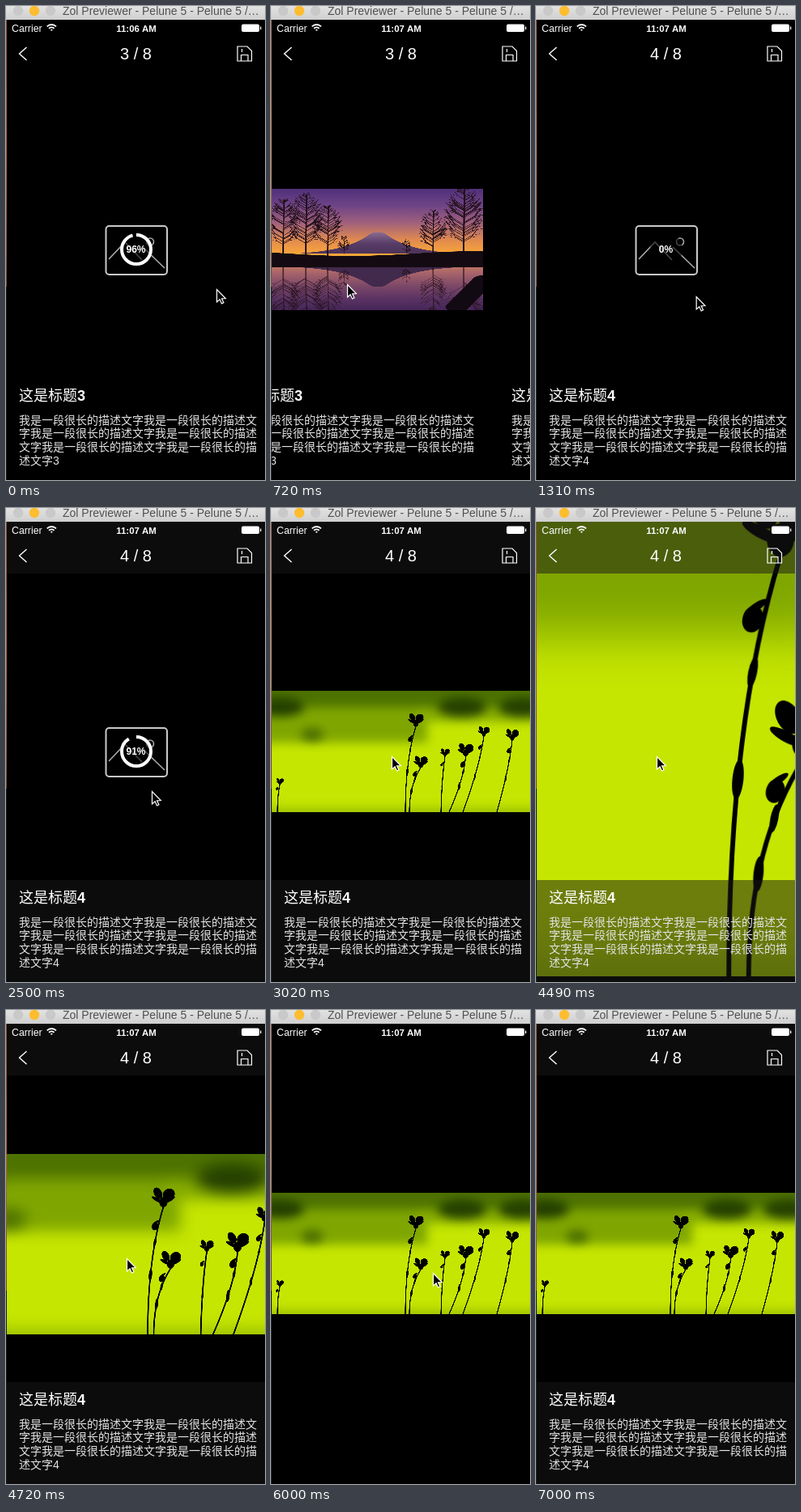
An HTML page with a canvas for the animation above (7280 ms loop, 320 px wide and 586 px high).

```html
<!DOCTYPE html>
<html lang="zh-CN">
<head>
<meta charset="utf-8">
<style>
html, body { margin: 0; width: 100%; height: 100%; overflow: hidden; background: #000; }
canvas { display: block; width: 320px; height: 586px; }
</style>
</head>
<body>
<canvas id="stage" width="320" height="586"></canvas>
<script>
let ctx = document.getElementById('stage').getContext('2d');
const LOOP = 7280, PAGE = 340;
const FONT = '"Liberation Sans", "Noto Sans CJK SC", "Noto Sans CJK JP", sans-serif';

function ramp(t, from, to) {
  const u = Math.max(0, Math.min(1, (t - from) / (to - from)));
  return u * u * (3 - 2 * u);
}

let seed = 5;
function random(a, b) {
  seed = (seed * 16807) % 2147483647;
  return a + (b - a) * seed / 2147483647;
}

function rect(x, y, w, h, color) {
  ctx.fillStyle = color;
  ctx.fillRect(x, y, w, h);
}
function path(points, close) {
  ctx.beginPath();
  points.forEach(p => ctx.lineTo(...p));
  if (close) ctx.closePath();
}
function line(points, color, width, close) {
  path(points, close);
  ctx.strokeStyle = color;
  ctx.lineWidth = width;
  ctx.stroke();
}
function shape(points, color) {
  path(points, true);
  ctx.fillStyle = color;
  ctx.fill();
}
function oval(x, y, rx, ry, color, turn = 0) {
  ctx.beginPath();
  ctx.ellipse(x, y, rx, ry, turn, 0, 7);
  ctx.fillStyle = color;
  ctx.fill();
}
function arc(x, y, r, from, to, color, width) {
  ctx.beginPath();
  ctx.arc(x, y, r, from * Math.PI, to * Math.PI);
  ctx.strokeStyle = color;
  ctx.lineWidth = width;
  ctx.stroke();
}
function text(s, x, y, size, color = '#fff', align = 'left', weight = 400) {
  ctx.font = `${weight} ${size}px ${FONT}`;
  ctx.textAlign = align;
  ctx.fillStyle = color;
  ctx.fillText(s, x, y);
}
function fade(y0, y1, ...colors) {
  const g = ctx.createLinearGradient(0, y0, 0, y1);
  colors.forEach((c, i) => g.addColorStop(i / (colors.length - 1), c));
  return g;
}
function layer(alpha, draw) {
  if (alpha <= 0) return;
  ctx.save();
  ctx.globalAlpha *= alpha;
  draw();
  ctx.restore();
}

// Photos are drawn once, in a 320 x 150 box.
function photo(scale, draw) {
  const stage = ctx, canvas = document.createElement('canvas');
  canvas.width = 320 * scale;
  canvas.height = 150 * scale;
  ctx = canvas.getContext('2d');
  ctx.scale(scale, scale);
  draw(scale);
  ctx = stage;
  return canvas;
}

function tree(x, base, h) {
  const color = '#26121c';
  line([[x, base], [x + 1, base - h]], color, h / 40);
  for (let i = 0; i < h * 0.8; i++) {
    const k = random(0.2, 1), y = base - h * k, side = i % 2 ? 1 : -1;
    const len = h * 0.3 * Math.sin(Math.PI * (0.2 + 0.75 * k)) * random(0.6, 1);
    const mx = x + side * len * 0.6, my = y - len * 0.35;
    line([[x, y], [mx, my], [mx + side * len * 0.4, my - len * 0.5]], color, 0.6);
    line([[mx, my], [mx + side * len * 0.5, my - len * 0.1]], color, 0.4);
  }
}
function grove() {
  [[20, 60], [73, 70], [101, 76], [128, 62], [148, 25], [225, 20], [258, 56], [296, 84]].forEach(
    ([x, h]) => tree(x, 83, h));
}
function ridge(base, rise, color) {
  const points = [];
  for (let x = 90; x <= 290; x += 4) {
    const d = Math.max(0, Math.abs(x - 190) - 7);
    points.push([x, base - rise * Math.exp(-d / 36)]);
  }
  shape(points, color);
}
function shore(y, wave) {
  const points = [[320, 97], [0, 97]];
  for (let x = 0; x <= 320; x += 10) points.push([x, y - wave * Math.cos(x / 50)]);
  shape(points, '#140b12');
}
const lake = photo(3, () => {
  rect(0, 0, 320, 84, fade(0, 84, '#50307a', '#6e4486', '#a0607c', '#e08a50', '#ffab34'));
  rect(0, 84, 320, 66, fade(90, 150, '#cf8460', '#a5626a', '#7c4868', '#5c3464', '#452658'));
  ridge(82, 28, fade(54, 82, '#8a6a92', '#563c66', '#4c3258'));
  ridge(95, -26, '#422a4c');
  grove();
  layer(0.6, () => {
    ctx.translate(0, 178);
    ctx.scale(1, -1);
    grove();
  });
  shore(80, 3);
  for (let i = 0; i < 9; i++) oval(288 + i * 4, 146 - i * 4, 14, 7, '#120a12');
});

function leaf(x, y, size, turn) {
  oval(x, y, 1.4 * size, 5 * size, '#000', turn);
}
function blossom(x, y, size) {
  ctx.save();
  ctx.translate(x, y);
  ctx.scale(size, size);
  oval(-4.5, -11.5, 3.2, 5, '#000', -0.5);
  oval(4.5, -10.5, 5.2, 4.6, '#000', -0.6);
  for (const side of [-1, 1]) oval(side * 5, -6, 5.2, 1.5, '#000', -side * 0.5);
  oval(0, -4, 3.4, 4.2, '#000');
  ctx.restore();
}
// The stem runs from the blossom to its foot; bend moves its middle toward the blossom.
function flower(x, y, foot, size, bend) {
  const cx = foot + (x - foot) * bend, cy = y + (150 - y) * 0.4;
  const at = u => {
    const v = 1 - u;
    return [v * v * x + 2 * u * v * cx + u * u * foot, v * v * y + 2 * u * v * cy + u * u * 150];
  };
  ctx.beginPath();
  ctx.moveTo(x, y);
  ctx.quadraticCurveTo(cx, cy, foot, 150);
  ctx.strokeStyle = '#000';
  ctx.lineWidth = 1.2;
  ctx.stroke();
  blossom(x, y, size);
  const [bx, by] = at(0.18);
  oval(bx - 2.7, by, 2.6 * size, 3.4 * size, '#000', 0.3);
  oval(bx - 2, by - 3 * size, 3.4 * size, size, '#000', -0.6);
  leaf(...at(0.32), 0.8 * size, 0.2);
  leaf(...at(0.58), size, 0.1);
}
const meadow = photo(5, scale => {
  ctx.filter = `blur(${6 * scale}px)`;
  rect(-30, -30, 380, 210, '#c5e600');
  rect(-30, -30, 222, 94, '#7fa600');
  rect(180, -30, 170, 68, '#86ac00');
  rect(-30, -30, 380, 50, '#4e7200');
  for (const x of [10, 235, 310]) oval(x, 20, 30, 12, '#254000');
  oval(50, 54, 14, 8, '#4a6c00');
  rect(-30, 145, 380, 40, '#9cc000');
  ctx.filter = 'none';
  flower(178, 44, 165, 1, 0);
  flower(184, 95, 170, 0.9, 0);
  flower(214, 81, 209, 0.6, 0.2);
  flower(239.5, 81, 219, 1, 0.9);
  flower(262, 56, 236, 0.75, 0.8);
  flower(297, 61, 278, 0.85, 0.8);
  flower(10, 116, 7, 0.5, 0);
});

function placeholder(percent) {
  const grey = '#aaa';
  ctx.strokeStyle = '#c9c9c9';
  ctx.lineWidth = 2;
  ctx.beginPath();
  ctx.roundRect(123.5, 272, 75.5, 60, 4);
  ctx.stroke();
  line([[127, 313], [147, 292], [168, 314]], grey, 1.6);
  line([[169, 298], [196, 324]], grey, 1.6);
  arc(178, 291.5, 4.5, 0, 2, grey, 1.6);
  oval(161, 301, 20, 20, 'rgba(0,0,0,.6)');
  arc(161, 301, 18, -0.5, percent / 50 - 0.5, '#fff', 4);
  text(Math.floor(percent) + '%', 160.5, 305, 12, '#fff', 'center', 'bold');
}

function page({ n, x, percent, shown, zoom, bars, tint, image }) {
  ctx.save();
  ctx.translate(x, 0);
  layer(1 - shown, () => placeholder(percent));
  layer(shown, () => {
    // Zooming keeps the point (147.5, 324) in place.
    ctx.translate(147.5, 324);
    ctx.scale(zoom, zoom);
    ctx.drawImage(image, -146.5, -98, 320, 150);
  });
  layer(bars, () => {
    rect(0, 460, 320, 126, tint);
    text('这是标题', 16, 488, 18, '#fff', 'left', 500);
    text(n, 88, 488, 18, '#fff', 'left', 'bold');
    const body = '我是一段很长的描述文字'.repeat(6) + n;
    for (let i = 0; i < 4; i++) {
      text(body.slice(i * 21, i * 21 + 21), 16, 516.5 + i * 16.7, 14, '#e4e4e4', 'left', 300);
    }
  });
  ctx.restore();
}

function header(n, bars, tint) {
  layer(bars, () => {
    rect(1, 17, 319, 64, tint);
    text(n + ' / 8', 160.5, 66, 20, '#fff', 'center');
    line([[25.5, 51], [16.5, 59], [25.5, 67]], '#fff', 1.4);
    line([[286, 50], [298, 50], [303.5, 55.5], [303.5, 68], [286, 68]], '#fff', 1.2, true);
    line([[290.5, 68], [290.5, 60.5], [299, 60.5], [299, 68]], '#fff', 1.2);
    line([[291.5, 53], [291.5, 57]], '#fff', 1.2);
  });
}

function statusBar(t) {
  text('Carrier', 7, 31.5, 12.3);
  text(t < 400 ? '11:06 AM' : '11:07 AM', 161, 31.5, 11.4, '#fff', 'center', 'bold');
  for (const r of [1.2, 4.6, 8]) arc(56.3, 31, r, -0.75, -0.25, '#fff', 1.8);
  ctx.beginPath();
  ctx.roundRect(291, 22.5, 22, 9.5, 2);
  ctx.fillStyle = '#fff';
  ctx.fill();
  rect(314, 25.5, 1.3, 3.5, '#fff');
}

function windowFrame() {
  rect(0, 0, 320, 17, fade(0, 17, '#e2e2e2', '#cfcfcf'));
  for (const x of [15, 35, 55]) oval(x, 6, 6.2, 6.2, x === 35 ? '#fdbd2f' : '#c9c9c9');
  text('Zol Previewer - Pelune 5 - Pelune 5 /…', 70, 11, 14, '#505050');
  rect(0, 17, 1, 330, fade(17, 347, '#8a4e30', '#b0653a', '#7a4a30'));
  rect(0, 347, 1, 239, '#152024');
}

function cursorAt(t) {
  let x = 260, y = 350;
  const move = (from, to, tx, ty) => {
    const p = ramp(t, from, to);
    x += (tx - x) * p;
    y += (ty - y) * p;
  };
  move(30, 720, 94, 344);
  move(780, 900, 60, 346);
  move(900, 1500, 240, 363);
  move(1530, 2070, 180, 350);
  move(2530, 2990, 163, 286);
  move(2990, 3020, 149, 307);
  move(5200, 5430, 200, 325);
  move(6510, 6650, 302, 554);
  return [x, y];
}
function cursor([x, y]) {
  const arrow = [[0, 0], [0, 15.5], [3.6, 12.2], [6, 17.4], [8.4, 16.3], [6, 11.3], [10.8, 11]];
  ctx.save();
  ctx.translate(x + 0.5, y + 0.5);
  shape(arrow, '#000');
  line(arrow, '#fff', 1.2, true);
  ctx.restore();
}

function draw() {
  const t = performance.now() % LOOP;
  // The page follows the pointer until it is let go, then slides on.
  const drag = Math.max(0, 153 - cursorAt(Math.min(t, 900))[0]);
  const scroll = drag + (PAGE - drag) * ramp(t, 900, 1300);
  const bars = 1 - ramp(t, 5780, 5990) + ramp(t, 6790, 6990);
  const tint = t < 1500 ? 'rgba(0,0,0,.5)' : 'rgba(25,25,25,.5)';

  rect(0, 0, 320, 586, '#000');
  if (scroll < PAGE) {
    page({
      n: 3, x: -scroll, zoom: 1, bars, tint, image: lake,
      percent: 96 + 4 * ramp(t, 30, 80), shown: ramp(t, 70, 250)
    });
  }
  if (scroll > 0) {
    page({
      n: 4, x: PAGE - scroll, bars, tint, image: meadow,
      zoom: 1 + 4 * (ramp(t, 3340, 3770) - ramp(t, 4460, 4794)),
      percent: 60 * ramp(t, 1350, 2070) + 40 * ramp(t, 2280, 2595), shown: ramp(t, 2595, 2800)
    });
  }
  header(scroll < PAGE / 2 ? 3 : 4, bars, tint);
  statusBar(t);
  windowFrame();
  if (t < 6670) cursor(cursorAt(t));
  requestAnimationFrame(draw);
}
draw();
</script>
</body>
</html>
```
